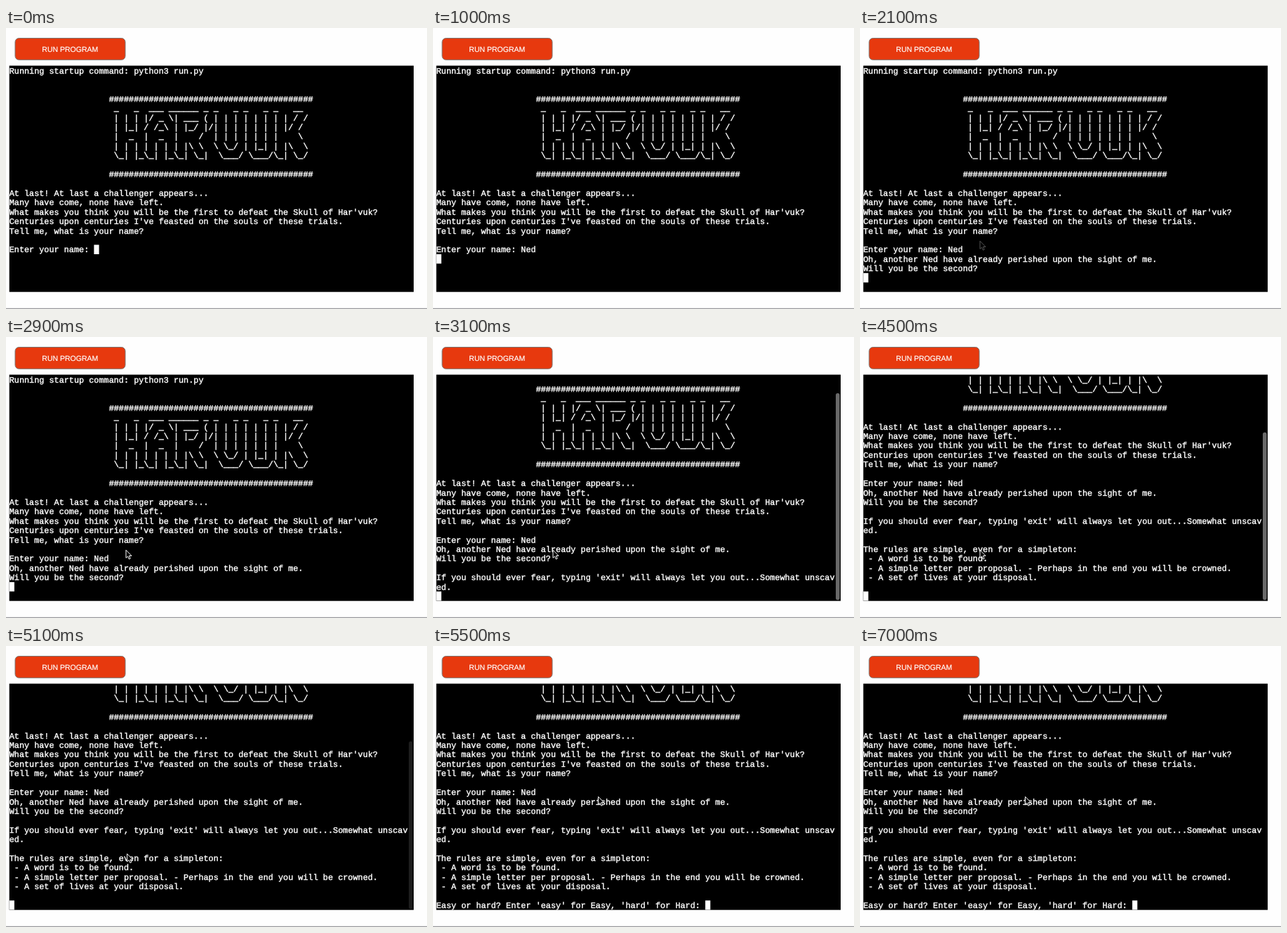
These frames come from a looping animation (600x400 px, 7400 ms). An HTML page:

```html
<!DOCTYPE html>
<html lang="en">
<head>
<meta charset="utf-8">
<title>Terminal game</title>
<style>
  html, body { margin: 0; width: 100%; height: 100%; overflow: hidden; background: #fefefe; }
  svg { display: block; width: 600px; height: 400px; }
  .mono text {
    font-family: "Liberation Mono", "Courier New", monospace;
    font-size: 11.83px;
    fill: #fff;
    stroke: #fff;
    stroke-width: .4px;
    white-space: pre;
    text-rendering: geometricPrecision;
  }
  .label {
    font-family: "Liberation Sans", Arial, sans-serif;
    font-size: 10.5px;
    fill: #fff;
    stroke: #fff;
    stroke-width: .2px;
    text-rendering: geometricPrecision;
  }
</style>
</head>
<body>
<svg viewBox="0 0 600 400" xmlns="http://www.w3.org/2000/svg">
  <defs><clipPath id="screen"><rect x="4.7" y="53.6" width="576.3" height="322.1"/></clipPath></defs>
  <rect width="600" height="400" fill="#fefefe"/>
  <rect y="398.8" width="600" height="1.2" fill="#98989c"/>
  <rect x="13" y="14.5" width="157" height="30.8" rx="5.5" fill="#e7390e" stroke="#7c7470"/>
  <text class="label" x="91.3" y="33.8" text-anchor="middle">RUN PROGRAM</text>
  <rect x="4.7" y="53.6" width="576.3" height="322.1" fill="#000"/>
  <g clip-path="url(#screen)">
    <g id="lines" class="mono"></g>
    <rect id="caret" width="7.2" height="13.4" fill="#fff"/>
    <rect id="thumb" x="574" width="5.6" rx="2.8" fill="#747474"/>
  </g>
  <path id="mouse" d="M0 0V11.2L2.6 8.9L4.3 12.9L6.2 12.1L4.5 8.2H8Z"
        fill="#000" stroke="#fff" stroke-width="1" stroke-linejoin="round"/>
</svg>
<script>
const LOOP = 7400, X0 = 4.7, Y0 = 53.6, CW = 7.1, LH = 13.42, ROWS = 24;
const NAME = "Ned", ASK = "Enter your name: ";
const CHOICE = "Easy or hard? Enter 'easy' for Easy, 'hard' for Hard: ";
const $ = id => document.getElementById(id);

const hashes = " ".repeat(20) + "#".repeat(41);
const banner = String.raw`
_   _  ___ ______ _ _   _ _   _ _   __
| | | |/ _ \| ___ ( | | | | | | | | / /
| |_| / /_\ | |_/ |/| | | | | | | |/ /
|  _  |  _  |    /  | | | | | | |    \
| | | | | | | |\ \  \ \_/ | |_| | |\  \
\_| |_\_| |_\_| \_|  \___/ \___/\_| \_/`
  .split("\n").slice(1).map(s => " ".repeat(21) + s);

const intro = ["Running startup command: python3 run.py", "", "", hashes, ...banner, "", hashes, "",
  "At last! At last a challenger appears...",
  "Many have come, none have left.",
  "What makes you think you will be the first to defeat the Skull of Har'vuk?",
  "Centuries upon centuries I've feasted on the souls of these trials.",
  "Tell me, what is your name?", ""];
const reply = [`Oh, another ${NAME} have already perished upon the sight of me.`, "Will you be the second?"];
const hint = ["", "If you should ever fear, typing 'exit' will always let you out...Somewhat unscav", "ed."];
const rules = ["", "The rules are simple, even for a simpleton:",
  " - A word is to be found.",
  " - A simple letter per proposal. - Perhaps in the end you will be crowned.",
  " - A set of lives at your disposal.", ""];

function linesAt(t) {
  const typed = (t >= 300) + (t >= 500) + (t >= 600);
  const out = [...intro, ASK + NAME.slice(0, typed)];
  if (t >= 2100) out.push(...reply);
  if (t >= 3100) out.push(...hint);
  if (t >= 4500) out.push(...rules);
  if (t >= 5500) out.push(CHOICE);
  else if (t >= 1000) out.push("");
  return out;
}

const clamp = v => Math.max(0, Math.min(1, v));

// Overlay scrollbar: quick fade in, hold, fade out
function barAlpha(t, show, hide) {
  if (t < show) return 0;
  return t < hide ? clamp(.9 + (t - show) / 1000) : clamp(.75 - (t - hide) / 400);
}

const rows = Array.from({ length: ROWS }, (_, i) => {
  const el = document.createElementNS("http://www.w3.org/2000/svg", "text");
  el.setAttribute("x", X0);
  el.setAttribute("y", Y0 + i * LH + 10.9);
  $("lines").append(el);
  return el;
});

function set(id, attrs) {
  for (const k in attrs) $(id).setAttribute(k, attrs[k]);
}

function draw(t) {
  const text = linesAt(t), last = text.length - 1;
  const scroll = Math.max(0, text.length - ROWS);
  rows.forEach((el, i) => {
    const s = text[i + scroll] || "";
    if (el.textContent !== s) el.textContent = s;
  });
  set("caret", { x: X0 + text[last].length * CW, y: Y0 + (last - scroll) * LH });

  const top = Y0 + ROWS * LH * scroll / (ROWS + scroll) + 1.6;
  const alpha = t < 4500 ? barAlpha(t, 3100, 3700) : barAlpha(t, 4500, 4900);
  set("thumb", { y: top, height: 374.2 - top, opacity: alpha });

  const p = clamp((t - 5013) / 487), s = p * p * (3 - 2 * p);
  set("mouse", {
    transform: `translate(${171 + 64.5 * s ** 1.5} ${303.3 - 88.8 * s})`,
    opacity: clamp((t - 2000) / 300)
  });
}

const start = performance.now();
function tick() {
  const t = (performance.now() - start) % LOOP;
  draw(Math.floor(t / 100) * 100);
  requestAnimationFrame(tick);
}
tick();
</script>
</body>
</html>
```
